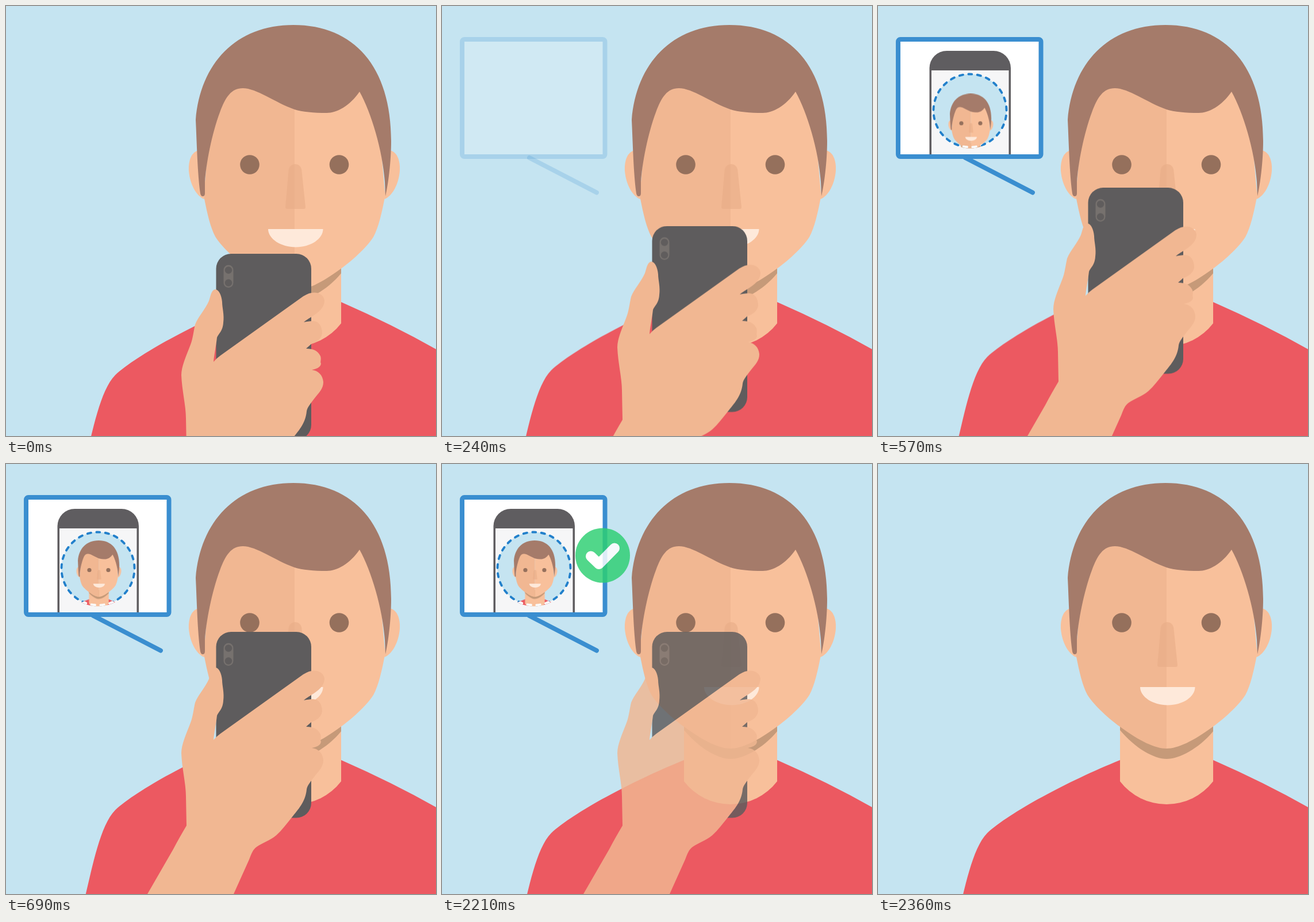
An HTML page for the animation above (2660 ms loop, 748 by 748 pixels).

```html
<!DOCTYPE html>
<html lang="en">
<head>
<meta charset="utf-8">
<title>Selfie check</title>
<style>
  html, body { margin: 0; height: 100%; overflow: hidden; background: #c5e4f1; }
  svg { display: block; width: 100vw; height: 100vh; }

  .lift, .hold, .shrug, .bubble, .preview, .rise, .badge {
    animation: 2660ms -2ms infinite linear;
  }
  .lift { animation-name: lift; }
  .hold { animation-name: hold; }
  .shrug { animation-name: shrug; }
  .bubble { animation-name: bubble; }
  .preview { animation-name: preview; }
  .rise { animation-name: rise; }
  .badge { animation-name: badge; }

  /* Motion advances in 30 ms ticks. */
  @keyframes lift {
    0% { transform: translateY(139px); animation-timing-function: steps(23); }
    25.9398%, 100% { transform: translateY(0); }
  }
  @keyframes rise {
    0% { transform: translateY(112px); animation-timing-function: steps(23); }
    25.9398%, 100% { transform: translateY(0); }
  }
  @keyframes shrug {
    0% { transform: translateY(0); }
    4.5113% { transform: translateY(0); animation-timing-function: steps(19); }
    25.9398% { transform: translateY(-40px); animation-timing-function: steps(1); }
    83.0827%, 100% { transform: translateY(0); }
  }
  @keyframes hold {
    0% { opacity: 1; }
    81.9549% { opacity: 1; animation-timing-function: steps(6); }
    88.7218%, 100% { opacity: 0; }
  }
  @keyframes bubble {
    0% { opacity: 0; }
    7.8947% { opacity: 0; animation-timing-function: steps(5); }
    13.5338% { opacity: 1; }
    83.0827% { opacity: 1; animation-timing-function: steps(5); }
    88.7218%, 100% { opacity: 0; }
  }
  @keyframes preview {
    0% { opacity: 0; }
    11.2782% { opacity: 0; animation-timing-function: steps(4); }
    15.7895% { opacity: 1; }
    83.0827% { opacity: 1; animation-timing-function: steps(5); }
    88.7218%, 100% { opacity: 0; }
  }
  @keyframes badge {
    0% { opacity: 0; }
    30.8271% { opacity: 0; animation-timing-function: steps(4); }
    35.3383% { opacity: 1; }
    81.9549% { opacity: 1; animation-timing-function: steps(6); }
    88.7218%, 100% { opacity: 0; }
  }
</style>
</head>
<body>
<svg viewBox="0 0 748 748">
  <defs>
    <path id="arm" fill="#ec5961" d="M130 830L139 787C150 742 164 668 190 642C229 606 330 552 421 515H440V830Z"/>
    <path id="torso" fill="#ec5961" d="M421 515H583Q672 554 748 597V748H421Z"/>

    <path id="ear" fill="#f8c09b" d="M336 251C323 253 317 268 318 287C320 310 331 331 345 336Z"/>
    <path id="cheek" d="M502 120H362L344 330C350 362 356 386 364 401C372 415 398 441 421 457C455 482 482 495 502 495Z"/>

    <g id="head">
      <path fill="#f8c09b" d="M421 440V552A102 102 0 0 0 583 552V440Z"/>
      <path fill="#c69a79" d="M421 440V463C448 495 480 513 502 513S558 495 583 465V440Z"/>
      <use href="#ear"/>
      <use href="#ear" transform="matrix(-1 0 0 1 1003 0)"/>
      <use href="#cheek" fill="#f8c09b" transform="matrix(-1 0 0 1 1003.5 0)"/>
      <use href="#cheek" fill="#f1b792"/>
      <path fill="#a57b6a" d="M330 198C338 100 400 33 500 33C605 33 670 105 670 235C670 270 665 310 660 331L659 306C655 250 635 185 615 149C598 174 575 186 558 186C535 186 515 184 502 180C468 168 436 143 412 143C392 143 382 158 372 185C358 222 348 275 346 306V326Q346 331 342 331Q339 331 338 326C333 290 332 240 330 198Z"/>
      <circle cx="424" cy="276" r="16.8" fill="#95705c"/>
      <circle cx="579.5" cy="276" r="16.8" fill="#95705c"/>
      <path fill="#e8ab85" opacity=".55" d="M491.500 287C492 271 514 271 514.500 287L521 350Q521 353 518 353H489Q486 353 486 350Z"/>
      <path fill="#fee9da" d="M456 388H551.500C551.500 405 530 419.500 504 419.500S456 405 456 388Z"/>
    </g>

    <g id="mini" transform="translate(55.1 126) scale(.212)">
      <use href="#arm"/>
      <use href="#torso"/>
      <use href="#head"/>
    </g>

    <circle id="ring" cx="160" cy="182" r="63.500" fill="none" stroke-width="3.900" stroke-linecap="round"
      stroke-dasharray="6.500 9.459" stroke-dashoffset="3.250" transform="rotate(-90 160 182)"/>
    <clipPath id="lens"><circle cx="160" cy="182" r="65.500"/></clipPath>
    <mask id="shape" style="mask-type: alpha" maskUnits="userSpaceOnUse" x="80" y="100" width="160" height="160">
      <g class="rise"><use href="#mini"/></g>
    </mask>
  </defs>

  <rect width="748" height="748" fill="#c5e4f1"/>

  <use href="#torso"/>
  <g class="shrug"><use href="#arm"/></g>
  <use href="#head"/>

  <g class="hold">
    <g class="lift">
      <rect x="365.500" y="292" width="165.500" height="323.500" rx="26" fill="#5e5c5d"/>
      <rect x="378.500" y="311.500" width="17" height="39.500" rx="8.500" fill="#76716e"/>
      <circle cx="387" cy="320.500" r="6.200" fill="#605d5d"/>
      <circle cx="387" cy="342.500" r="6.200" fill="#605d5d"/>
      <path fill="#f1b792" d="M364 354C357 355 356 365 353 374C347 388 334 402 329 415C326 428 325 440 321 450C313 471 305 488 305 503C306 530 313 556 313 578L314 629C306 643 298 656 291 670L246 748H396L423 688C427 678 429 671 436 666C446 659 459 655 470 646C480 637 488 626 497 615C508 601 521 588 523 566C524 559 531 551 537 543C546 532 552 526 552 515C551 503 543 495 532 494C540 492 547 490 548 483C546 480 549 476 547 470C542 460 534 457 522 457L531 449C540 446 549 440 550 430C550 418 544 409 534 409C528 409 523 410 518 411C526 404 534 401 541 395C549 389 554 382 554 373C552 361 539 357 527 361Q522 363 517 366L373 469Q366 474 361 480C362 468 365 455 367 438C370 430 377 427 378 412C380 398 376 386 376 376C375 364 370 354 364 354Z"/>
    </g>
  </g>

  <rect class="bubble" x="35" y="58" width="248.500" height="204" rx="4" fill="#fff" stroke="#3a8ed0" stroke-width="8"/>
  <path class="bubble" d="M152 264L269 324.500" stroke="#3a8ed0" stroke-width="8" stroke-linecap="round"/>

  <g class="preview">
    <path fill="#5f5d60" d="M89.500 258V108A30 30 0 0 1 119.500 78H201A30 30 0 0 1 231 108V258Z"/>
    <rect x="93" y="112" width="134.500" height="146" fill="#f6f6f7"/>
    <circle cx="160" cy="182" r="63.500" fill="#c5e4f1"/>
    <use href="#ring" stroke="#2280cb"/>
    <g clip-path="url(#lens)">
      <g class="rise"><use href="#mini"/></g>
    </g>
    <g mask="url(#shape)"><use href="#ring" stroke="#fafafa"/></g>
  </g>

  <g class="badge">
    <circle cx="279.500" cy="159" r="47.500" fill="#2ecf73"/>
    <path d="M259 160.500L273 174L300 146.500" fill="none" stroke="#fff" stroke-width="18" stroke-linecap="round" stroke-linejoin="round"/>
  </g>
</svg>
</body>
</html>
```
